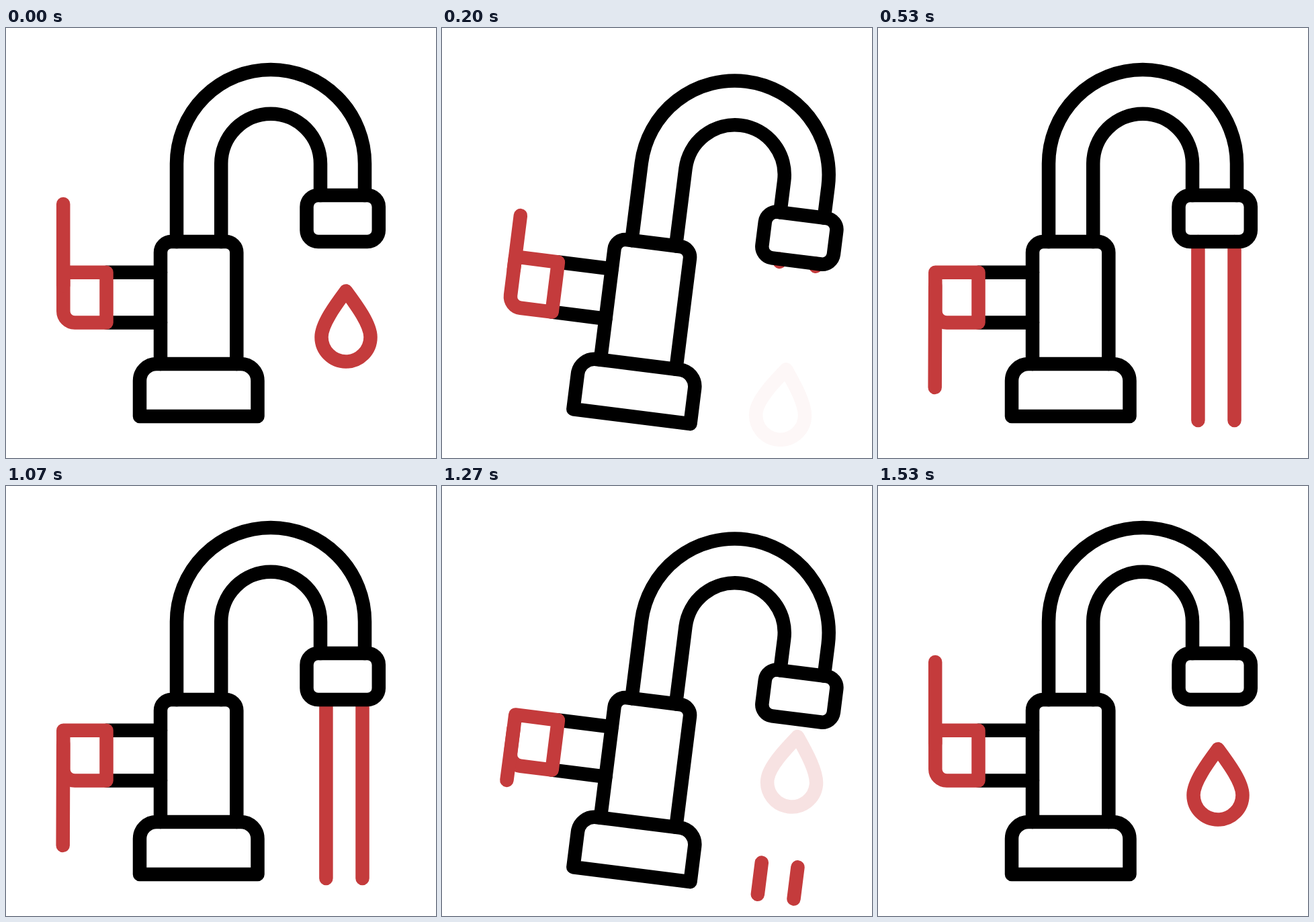
An HTML page for the animation above (1670 ms loop, 640 by 640 pixels).

```html
<!DOCTYPE html>
<html lang="en">
<head>
<meta charset="utf-8">
<title>Tap</title>
<style>
  html, body { margin: 0; height: 100%; overflow: hidden; background: #fff; }
  svg { display: block; width: 100%; height: 100%; }
  path, rect { fill: none; stroke-width: 20.5; stroke-linecap: round; stroke-linejoin: round; }
  .black { stroke: #000; }
  .red { stroke: #c43b3c; }
</style>
</head>
<body>
<svg viewBox="0 0 640 640">
  <g id="tap">
    <path id="drop" class="red" d="M506 391.5C490 413 469.5 441 469.5 460a36.5 36.5 0 0 0 73 0C542.5 441 522 413 506 391.5Z"/>
    <path id="water" class="red"/>
    <g class="black">
      <path d="M254 318V202a140 140 0 0 1 280 0V249"/>
      <path d="M320.2 318V202a73.9 74.3 0 0 1 147.8 0V249"/>
      <rect x="447.5" y="249" width="107.3" height="69" rx="17"/>
      <path d="M230 500V334a16 16 0 0 1 16-16H327.3a16 16 0 0 1 16 16V500"/>
      <path d="M199 578V525a25 25 0 0 1 25-25H349.5a25 25 0 0 1 25 25V578Z"/>
      <path d="M149.5 363.7H230M149.5 438.5H230"/>
    </g>
    <g class="red">
      <path d="M85.3 363.7H149.5V438.5H102.3a17 17 0 0 1-17-17Z"/>
      <path id="lever"/>
    </g>
  </g>
</svg>
<script>
  const LOOP = 1670, FPS = 30;
  const [tap, drop, water, lever] =
    ['tap', 'drop', 'water', 'lever'].map(id => document.getElementById(id));

  const ease = t => t ** 1.8 / (t ** 1.8 + (1 - t) ** 1.8);

  // Eased value at a step, from [step, value] keys.
  function track(step, ...keys) {
    if (step <= keys[0][0]) return keys[0][1];
    for (let i = 1; i < keys.length; i++) {
      const [a, from] = keys[i - 1], [b, to] = keys[i];
      if (step < b) return from + (to - from) * ease((step - a) / (b - a));
    }
    return keys[keys.length - 1][1];
  }

  function draw(ms) {
    // The motion advances in whole steps of 1/30 s.
    const step = Math.floor((ms % LOOP + 4) * FPS / 1000);

    const angle = track(step, [0, 0], [5, 8], [10, -3], [16, 0],
      [32, 0], [37, 8], [42, -3], [46, 0]);
    tap.setAttribute('transform', `rotate(${angle} 283 543.5)`);

    const tip = track(step, [4.5, 262], [10, 535], [36, 535], [41.5, 262]);
    lever.setAttribute('d', `M85.2 383.5L${tip > 383 ? 84.7 : 85.2} ${tip}`);

    const top = track(step, [31, 318], [41, 584]);
    const bottom = track(step, [5, 318], [16, 584]);
    water.setAttribute('d', bottom - top > 0.5
      ? `M476.4 ${top}V${bottom}M530.5 ${top}V${bottom}` : '');

    const leaving = step < 20;
    const shift = leaving ? track(step, [0, 0], [7, 92]) : track(step, [35, -56], [46, 0]);
    drop.setAttribute('transform', `translate(0 ${shift})`);
    drop.setAttribute('opacity', leaving
      ? track(step, [0, 1], [7, 0]) : track(step, [35, 0], [46, 1]));
  }

  const start = performance.now();
  function tick() {
    draw(performance.now() - start);
    requestAnimationFrame(tick);
  }
  tick();
</script>
</body>
</html>
```
